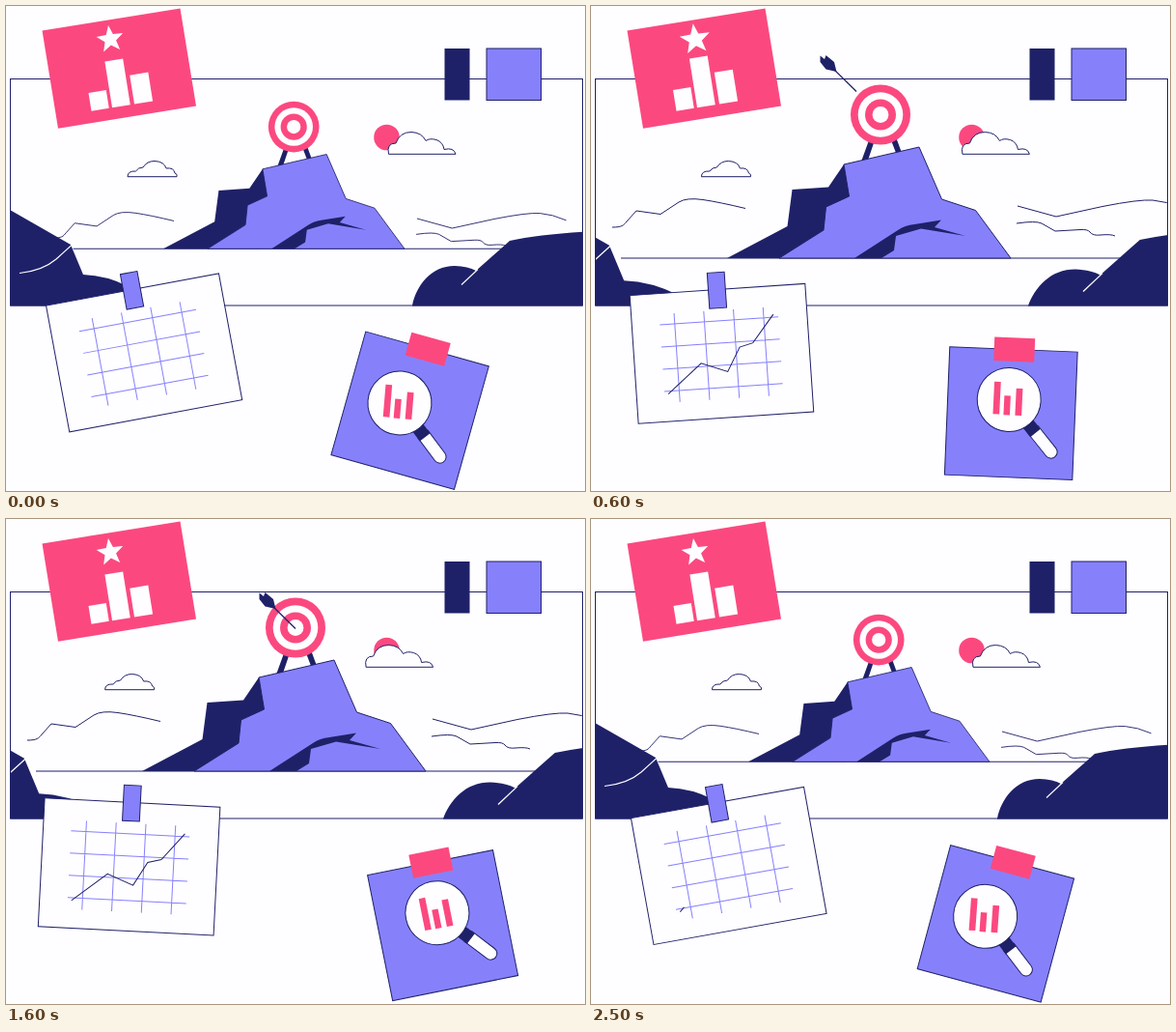
These frames come from a looping animation (600x502 px, 2600 ms). An HTML page:

```html
<!DOCTYPE html>
<html lang="en">
<head>
<meta charset="utf-8">
<title>Goals and growth</title>
<style>
  html, body { margin: 0; width: 100%; height: 100%; overflow: hidden; background: #fefdff; }
  svg { display: block; width: 100vw; height: 100vh; }
  .ink { stroke: #1f2168; stroke-width: 1; }
  .line { fill: none; stroke: #1f2168; stroke-width: 1; }
  .navy { fill: #1f2168; }
  .pink { fill: #fb4980; }
  .violet { fill: #8681fb; }
  .paper { fill: #fefdff; }
  .crease { fill: none; stroke: #fefdff; stroke-width: 1.1; }
  .grid { fill: none; stroke: #8681fb; stroke-width: 1; }
</style>
</head>
<body>
<svg viewBox="0 0 600 502" preserveAspectRatio="none">
  <clipPath id="window"><rect x="4.5" y="75.5" width="593" height="235"/></clipPath>
  <rect class="paper" x="4.5" y="75.5" width="593" height="234.5"/>

  <g clip-path="url(#window)">
    <path id="hillsLeft" class="line" d="M22 229C32 229 34 227 37 223L47 212L72 215.5L91 203Q99 198 116 200.500T160 209.500"/>
    <path id="hillsRight" class="line" d="M442 207L482 218L530 207.500Q568 200 582 201T612 209M441 225Q461 222 467 225L481 233L507 231.500Q515 231 517 234Q520 238 528 237Q539 236 543 238"/>
    <circle class="pink" cx="394.500" cy="136" r="13.300"/>
    <path id="cloudLeft" class="paper ink" d="M126 176.700Q126 170.500 134.500 171Q137 167 142 167Q146 160.500 154 160.500Q164 161 166 168Q174 167 175 173Q178 174 177 176.700Z"/>
    <path id="cloudRight" class="paper ink" d="M396.500 153.300Q394 142 404 142Q408 130.500 420 130.500Q431 131 435 139.500Q439 136.500 446 138.500Q453 141 454 148.500Q464 146 466 153.300Z"/>
    <g id="peak">
      <path class="line" d="M31 261H560" style="stroke-width:1.150"/>
      <path class="navy" d="M288 139H294L286.500 161H280ZM311 139L316.500 137L322 152H316Z"/>
      <path class="navy" d="M141 261L203.500 228L208.500 190L246 187.500L262 164L275 190L260 261Z"/>
      <path class="violet ink" d="M435 261H195L241 232L243.500 208L267.500 197L262 164L340 146L363.500 200L398.500 211.500Z"/>
      <path class="navy" d="M273 261L318 232Q325 227 335 226L363 221.500L356 229L388 238L342 230.500L316 238L314 253L301 261Z"/>
      <circle class="pink" cx="300" cy="112.500" r="31"/>
      <circle class="paper" cx="300" cy="112.500" r="23.300"/>
      <circle class="pink" cx="300" cy="112.500" r="16"/>
      <circle class="paper" cx="300" cy="112.500" r="8.400"/>
    </g>
    <path id="bushLeft" class="navy" d="M-10 203L67 247L80 278Q105 279 127 290.500L150 310V345H-10Z"/>
    <path id="creaseLeft" class="crease" d="M14 276.500Q38 274 52 262L68 247.500"/>
    <path id="bushRight" class="navy" d="M412 345L421 310C425 290 440 269 465 269Q479 269.500 487 274L522 243Q555 236 612 233V345Z"/>
    <path id="creaseRight" class="crease" d="M472 288.500L489 272.500"/>
  </g>
  <rect class="line" x="4.500" y="75.500" width="593" height="234.500"/>

  <g id="arrow">
    <path class="line" style="stroke-width:1.300" d="M275 89L300 113.500"/>
    <path class="navy" d="M262.500 76.500L267 80L268.500 76L277 83L279.500 93L268.500 90.500L262.500 83Z"/>
  </g>

  <rect class="navy" x="454.500" y="44" width="26" height="53.500"/>
  <rect class="violet ink" x="498" y="44" width="56.500" height="53.500"/>

  <path class="pink" d="M37.500 25.500L180.500 2.500L197 103.500L54 126.700Z"/>
  <g transform="translate(88.500 108.700) rotate(-9.100)" class="paper" id="podium"></g>
  <polygon id="star" class="paper"/>

  <g id="chart">
    <rect class="paper ink" x="40" y="293.500" width="182" height="133"/>
    <path id="grid" class="grid"/>
    <path id="trend" class="line" pathLength="1" d="M73 398L109 368.500L136 379L150 354.500L164 351L187 323"/>
    <rect class="violet ink" x="121.500" y="275.700" width="17.800" height="37"/>
  </g>

  <g id="note">
    <rect class="violet ink" x="372" y="355.500" width="132.500" height="132.500"/>
    <g id="lens">
      <g transform="rotate(48.500)">
        <path class="paper ink" d="M40 -6.500H69.500A6.500 6.500 0 0 1 69.500 6.500H40Z"/>
        <path class="navy" d="M28 -6.500H44V7H28Z"/>
      </g>
      <circle class="paper ink" r="33"/>
      <path class="pink" d="M-16 -18h6.700v33.500h-6.700ZM-5 -4h6.500v20h-6.500ZM7 -12h6.700v28h-6.700Z"/>
    </g>
    <rect class="pink" x="418" y="343.300" width="42" height="24.700"/>
  </g>
</svg>
<script>
const LOOP = 2600, STEP = 100;
const $ = id => document.getElementById(id);
const place = (id, transform) => $(id).setAttribute('transform', transform);
const mix = (a, b, p) => a + (b - a) * p;

// Cosine ease from 0 to 1 between two times
const ease = (t, from, to) => {
  const u = Math.min(1, Math.max(0, (t - from) / (to - from)));
  return (1 - Math.cos(Math.PI * u)) / 2;
};
// Rises over one span and falls over a later one
const pulse = (t, a, b, c, d) => ease(t, a, b) - ease(t, c, d);
const zoom = (id, x, y, s) => place(id, `translate(${x} ${y}) scale(${s}) translate(${-x} ${-y})`);

const bars = [[0, 18.5, 22], [21.8, 19, 51.3], [45.1, 19.3, 33.3]].map(([x, w, h]) => {
  const rect = document.createElementNS('http://www.w3.org/2000/svg', 'rect');
  rect.setAttribute('x', x);
  rect.setAttribute('width', w);
  $('podium').append(rect);
  return { rect, h };
});

$('star').setAttribute('points', Array.from({ length: 10 }, (_, i) => {
  const a = i * Math.PI / 5 - Math.PI / 2, r = i % 2 ? 0.42 : 1;
  return `${r * Math.cos(a)},${r * Math.sin(a)}`;
}).join(' '));

$('grid').setAttribute('d', [0, 1, 2, 3].map(i =>
  `M${84.5 + i * 30.8} 315V407M69 ${326 + i * 23}H192`).join(''));
$('trend').style.strokeDasharray = '1 2';

function draw(t) {
  const sway = pulse(t, 0, 1300, 1320, 2620);
  const near = pulse(t, 0, 600, 1800, 2400);
  const cheer = pulse(t, 0, 400, 1200, 1600);

  zoom('peak', 288, 196, mix(0.85, 1, near));
  zoom('hillsLeft', 314, 352, mix(0.909, 1, near));
  zoom('hillsRight', 266, 350, mix(0.909, 1, near));
  for (const id of ['bushLeft', 'creaseLeft']) zoom(id, 340, 243, mix(1, 1.176, near));
  for (const id of ['bushRight', 'creaseRight']) zoom(id, 256, 249, mix(1, 1.176, near));
  for (const id of ['cloudLeft', 'cloudRight']) place(id, `translate(${-26.3 * sway} 0)`);

  const hit = pulse(t, 450, 750, 1650, 1950);
  place('arrow', `translate(${-50 * (1 - hit)} ${-50 * (1 - hit)})`);
  $('arrow').style.opacity = Math.min(1, hit * 2);

  for (const { rect, h } of bars) {
    const tall = h - 3 * (1 - cheer);
    rect.setAttribute('y', -tall);
    rect.setAttribute('height', tall);
  }
  place('star', `translate(108 34.500) rotate(-8) scale(${mix(14.6, 16.5, cheer)})`);

  place('chart', `rotate(${mix(-10.5, 4.6, sway)} 131 293.500)`);
  const drawn = pulse(t, 0, 575, 1846, 2598);
  $('trend').style.strokeDashoffset = 1 - drawn;
  $('trend').style.visibility = drawn > 0.001 ? 'visible' : 'hidden';

  place('note', `rotate(${mix(15.7, -14.7, sway)} 439.500 349)`);
  const scan = ease(t, 0, 400) * 1.08 - ease(t, 400, 800) * 0.08 - ease(t, 1800, 2400);
  place('lens', `translate(${mix(425.9, 435.2, scan)} ${mix(417.2, 408, scan)}) rotate(${-11 * (1 - scan)})`);
}

const start = performance.now();
function tick() {
  const t = (performance.now() - start) % LOOP;
  draw(Math.floor(t / STEP) * STEP);
  requestAnimationFrame(tick);
}
draw(0);
requestAnimationFrame(tick);
</script>
</body>
</html>
```
